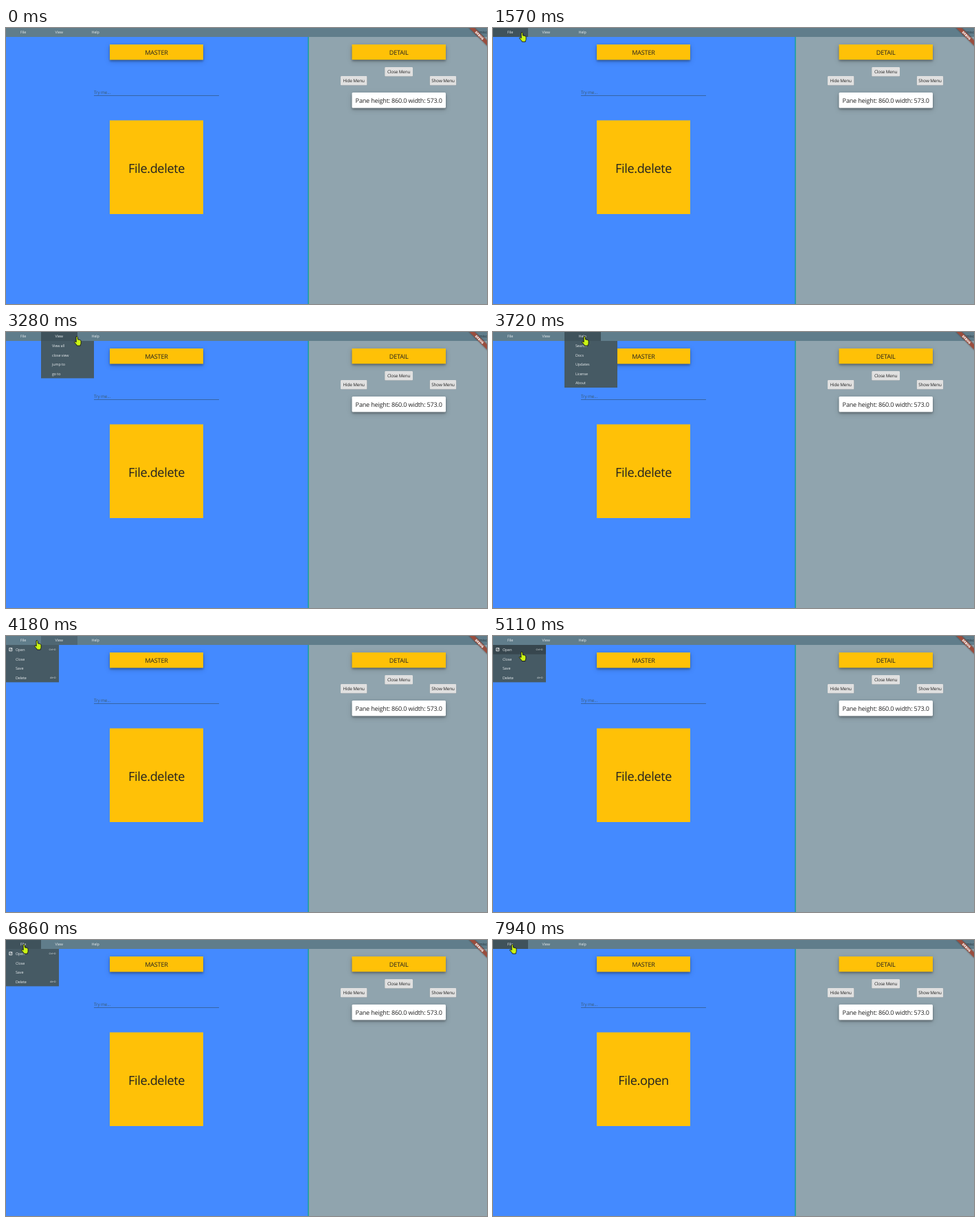
An HTML page for the animation above (8 s loop, 700 by 402 pixels).

```html
<!DOCTYPE html>
<html lang="en">
<head>
<meta charset="utf-8">
<title>Menu bar demo</title>
<style>
  html, body { margin: 0; width: 100%; height: 100%; overflow: hidden; background: #448aff; }
  svg { display: block; width: 700px; height: 402px; }
  text { font-family: "Open Sans", "Noto Sans", sans-serif; letter-spacing: -.02em; fill: #212121; text-rendering: geometricPrecision; }
  .mid { text-anchor: middle; }
  .title { font-size: 9.05px; }
  .label { font-size: 6.33px; }
  .big { font-size: 18.1px; }
  .bar text, .menu text { font-size: 5.43px; fill: #e6ebed; }
  .menu .key { font-size: 3.5px; text-anchor: end; }
  .raised { filter: drop-shadow(0 2.4px 1.8px rgba(0, 0, 0, .28)) drop-shadow(0 2.5px 3.5px rgba(0, 0, 0, .18)); }
  .button { fill: #e0e0e0; filter: drop-shadow(0 .7px .6px rgba(0, 0, 0, .4)); }
  .amber { fill: #ffc107; }
  .banner rect { fill: #9a4d3d; filter: drop-shadow(0 0 1.2px rgba(0, 0, 0, .5)); }
  .banner text { font-size: 4.6px; font-weight: 800; fill: #fff; letter-spacing: 0; }
</style>
</head>
<body>
<svg viewBox="0 0 700 402" xmlns="http://www.w3.org/2000/svg">
  <rect width="440" height="402" fill="#448aff"/>
  <rect x="440" width="260" height="402" fill="#90a4ae"/>
  <rect x="439.3" width="1.4" height="402" fill="#12a094"/>

  <rect class="amber raised" x="151" y="24" width="136" height="22.4"/>
  <text class="mid title" x="219" y="39.2">MASTER</text>
  <text class="label" x="128" y="95.6" style="fill:#3a5a6c">Try me...</text>
  <rect x="128" y="98" width="182" height=".7" fill="#33557f"/>
  <rect class="amber" x="151" y="134.5" width="136" height="136.5"/>
  <text class="mid big" id="message" x="219" y="210.6"></text>

  <rect class="amber raised" x="503.5" y="24" width="136.5" height="22.2"/>
  <text class="mid title" x="571.7" y="39.2">DETAIL</text>
  <g id="buttons"></g>
  <rect class="raised" x="503.5" y="94" width="136.5" height="22.4" rx="1.5" fill="#fff"/>
  <text class="mid title" x="571.7" y="109.2">Pane height: 860.0 width: 573.0</text>

  <g class="bar">
    <rect width="700" height="13" fill="#607d8b"/>
    <g id="tabs"></g>
    <text x="700" y="8" text-anchor="end" style="fill:#26343b">misc</text>
  </g>
  <g id="menus"></g>

  <g class="banner" transform="translate(700 0) rotate(45)">
    <rect x="-20" y="12.7" width="40" height="5.4"/>
    <text class="mid" y="17.1">DEBUG</text>
  </g>

  <path id="hand" fill="#cbf514" stroke="#111" stroke-width=".9" stroke-linejoin="round"
    d="M4 1.4q1.4-1.2 2.2.4l.4 3.6 2.8.5q1.6.4 1.7 2l0 2.9q0 1.2-.8 2.3v1.4h-5l-.6-1.4-3-3.4q-.6-1.2.6-1.4l1.9.9z"/>
</svg>
<script>
const LOOP = 8000, BAR = 13, ROW = 13.6;
const ENTER = 440, STEP = LOOP / 51.2;
const $ = id => document.getElementById(id);

const menus = [
  { name: 'File', w: 51, items: ['Open', 'Close', 'Save', 'Delete'], keys: { Open: 'Ctrl+O', Delete: 'Alt+D' } },
  { name: 'View', w: 53, items: ['View all', 'close view', 'jump to', 'go to'] },
  { name: 'Help', w: 53, items: ['Search', 'Docs', 'Updates', 'License', 'About'] }
];
menus.forEach((m, i) => m.x = i ? menus[i - 1].x + menus[i - 1].w : 0);

// Pointer legs: start, end and the spot the fingertip goes to
const tabY = 7;
const rowY = i => BAR + ROW * (i + .3);
const legs = [
  { from: ENTER, till: 1510, x: 42, y: tabY },
  { from: 2300, till: 3100, x: 103, y: tabY },
  { from: 3250, till: 3560, x: 133, y: tabY },
  { from: 3720, till: 4160, x: 45, y: tabY },
  { from: 4810, till: 5590, x: 35, y: rowY(3) },
  { from: 6050, till: 6820, x: 26, y: tabY },
  { from: 6860, till: 7150, x: 31, y: rowY(0) },
  { from: 7700, till: 7910, x: 28, y: tabY }
];
const easeOut = u => u * (2 - u);
const easeInOut = u => u * u * (3 - 2 * u);

function pointer(t) {
  let x = 589, y = 343;
  legs.forEach((leg, i) => {
    const u = Math.min(1, Math.max(0, (t - leg.from) / (leg.till - leg.from)));
    const k = (i ? easeInOut : easeOut)(u);
    x += (leg.x - x) * k;
    y += (leg.y - y) * k;
  });
  return { x, y };
}

function hoveredTab(t) {
  const { x, y } = pointer(t);
  return y < BAR ? menus.findIndex(m => x >= m.x && x < m.x + m.w) : -1;
}

const button = (name, cx, y) => {
  const w = 17 + 2.38 * name.length;
  return `<rect class="button" x="${cx - w / 2}" y="${y}" width="${w}" height="13.4" rx="1"/>
    <text class="mid label" x="${cx}" y="${y + 9.2}">${name}</text>`;
};
$('buttons').innerHTML = button('Close Menu', 571.6, 57) + button('Hide Menu', 506.2, 70) + button('Show Menu', 636, 70);

$('tabs').innerHTML = menus.map(m =>
  `<rect x="${m.x}" width="${m.w}" height="13" opacity="0"/>
   <text class="mid" x="${m.x + m.w / 2 - .3}" y="8.1">${m.name}</text>`).join('');

const item = (m, name, i) => {
  const key = m.keys?.[name];
  return `<text x="${m.x + (m.keys ? 14 : 16)}" y="${21.9 + i * ROW}">${name}</text>` +
    (key ? `<text class="key" x="72.5" y="${21.3 + i * ROW}">${key}</text>` : '');
};
const icon = '<path d="M6.4 17.6H4.8v4.2h4v-1.6M6.2 17.6h2.6v2.6M6 20.6l2.6-2.8" fill="none" stroke="#fff" stroke-width=".8"/>';
$('menus').innerHTML = menus.map(m =>
  `<g class="menu" visibility="hidden">
    <rect x="${m.x}" y="${BAR}" width="77" height="${m.items.length * ROW}" fill="#465a64"/>
    <rect class="mark" x="${m.x}" width="77" height="${ROW}" fill-opacity=".22"/>
    ${m.items.map((name, i) => item(m, name, i)).join('')}
    ${m.keys ? icon : ''}
  </g>`).join('');

const tabBoxes = [...$('tabs').querySelectorAll('rect')];
const panels = [...$('menus').children];

function draw(now) {
  const t = now % LOOP;
  // The pointer is only refreshed every STEP
  const tick = t - (t - ENTER + 20 + LOOP) % LOOP % STEP;
  const { x, y } = pointer(tick);
  const tab = t < ENTER ? -1 : hoveredTab(tick), before = hoveredTab(tick - STEP);
  const open = (t >= 2020 && t < 5890) || (t >= 6860 && t < 7470);
  const shown = open ? Math.max(tab, 0) : -1;
  const switching = open && tab >= 0 && before >= 0 && tab !== before;

  // While switching menus the old tab fades before the new one lights up
  tabBoxes.forEach((box, i) => {
    const level = switching ? (i === before) / 2 : i === tab;
    box.setAttribute('opacity', .35 * level);
  });
  const row = Math.floor((y - BAR) / ROW);
  panels.forEach((panel, i) => {
    const mark = panel.querySelector('.mark');
    panel.setAttribute('visibility', i === shown ? 'visible' : 'hidden');
    mark.setAttribute('y', BAR + Math.max(row, 0) * ROW);
    mark.setAttribute('opacity', row < 0 ? 0 : 1);
  });
  $('message').textContent = t < 7470 ? 'File.delete' : 'File.open';
  $('hand').setAttribute('transform', `translate(${x - 5} ${y - 1.5})`);
  $('hand').setAttribute('visibility', t < ENTER ? 'hidden' : 'visible');
}

const start = performance.now();
function frame() {
  draw(performance.now() - start);
  requestAnimationFrame(frame);
}
frame();
</script>
</body>
</html>
```
